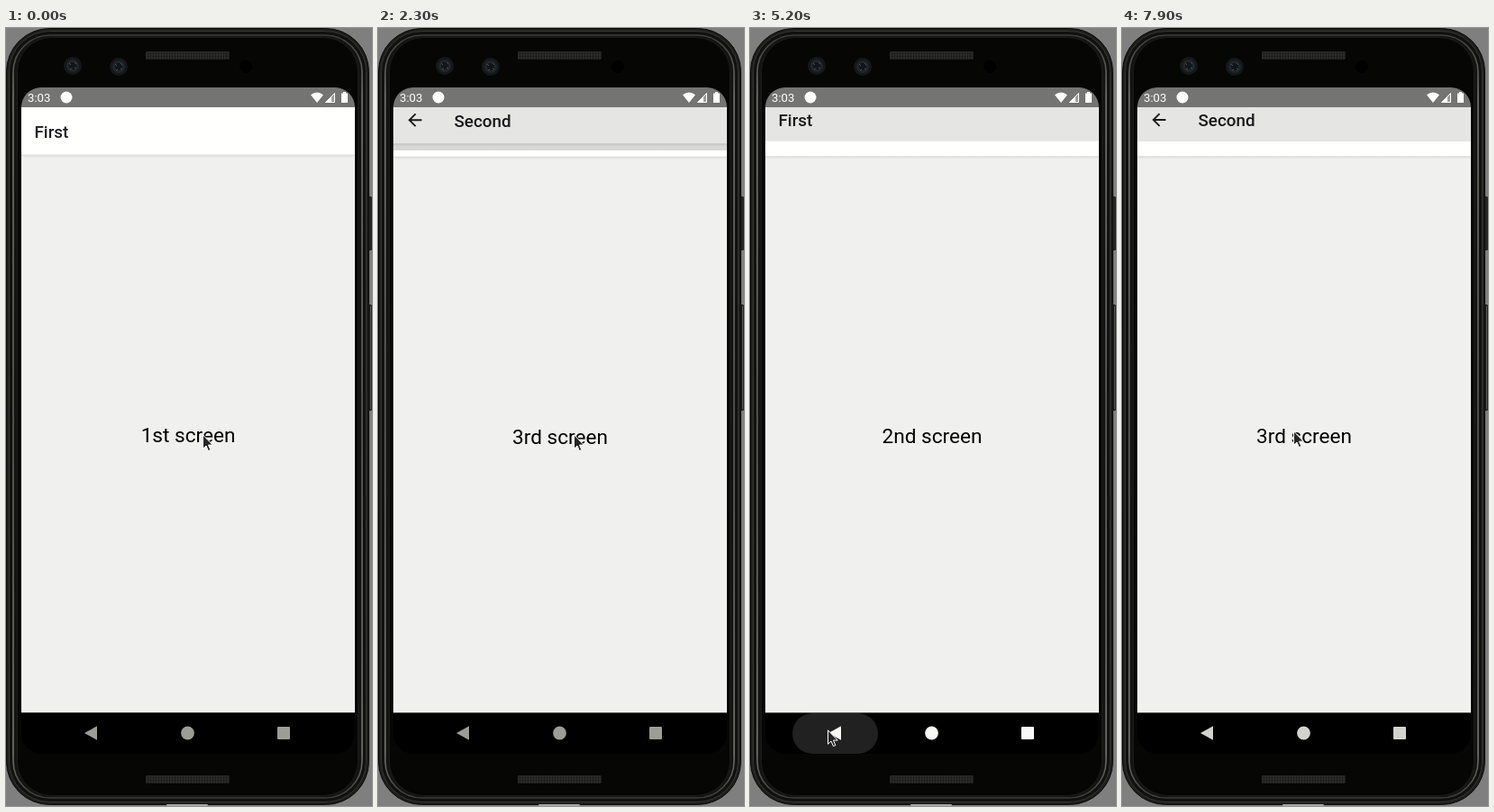
An HTML page for the animation above (8000 ms loop, 406 px wide and 864 px high).

```html
<!DOCTYPE html>
<html lang="en">
<head>
<meta charset="utf-8">
<title>Stack navigation</title>
<style>
  html, body { margin: 0; width: 100%; height: 100%; overflow: hidden; background: #7f7f7f; }
  svg { display: block; width: 406px; height: 864px; }
  text { font-family: Roboto, "Open Sans", sans-serif; }
  .title { font-size: 18.84px; font-weight: 500; fill: #1c1c1e; }
  .label { font-size: 22.6px; text-anchor: middle; fill: #000; }
</style>
</head>
<body>
<svg viewBox="0 0 406 864">
  <defs>
    <linearGradient id="shadow" x2="0" y2="1">
      <stop offset="0" stop-color="#d3d3d2"/>
      <stop offset="1" stop-color="#f0f0ef"/>
    </linearGradient>
    <linearGradient id="rim" x2="0" y2="1">
      <stop offset="0" stop-color="#3c3c39"/>
      <stop offset=".08" stop-color="#73736e"/>
      <stop offset=".5" stop-color="#5c5c58"/>
      <stop offset=".94" stop-color="#73736e"/>
      <stop offset="1" stop-color="#3c3c39"/>
    </linearGradient>
    <pattern id="mesh" width="3" height="3" patternUnits="userSpaceOnUse">
      <rect width="3" height="3" fill="#2b2b29"/>
      <circle cx="1.5" cy="1.5" r=".9" fill="#151514"/>
    </pattern>
    <clipPath id="window"><rect x="17" y="88" width="370" height="672.5"/></clipPath>
    <clipPath id="reveal"><rect id="revealBox" x="17" width="370"/></clipPath>
    <g id="lens">
      <circle r="10" fill="#15181a"/>
      <circle r="7" fill="#20262a"/>
      <circle r="4" fill="#121619"/>
      <path d="M-4-3l2 2M2-4l2 2M-3 4l2-1M2 2l2 1" stroke="#4a5258"/>
    </g>
  </defs>

  <!-- phone body -->
  <rect x="400" y="187" width="6" height="60" rx="1.5" fill="#262624"/>
  <rect x="400" y="307" width="6" height="118" rx="1.5" fill="#262624"/>
  <path d="M404.5 309V423" stroke="#555551"/>
  <rect x=".5" y=".5" width="402" height="862" rx="48" fill="#1d1d1b" stroke="#0c0c0b"/>
  <rect x="3.5" y="3.5" width="396" height="856" rx="45" fill="#111110" stroke="#383835"/>
  <rect x="8" y="8" width="387" height="847" rx="41" fill="#141413" stroke="url(#rim)" stroke-width="1.6"/>
  <rect x="12.5" y="10.5" width="378" height="842" rx="38" fill="#060605" stroke="#1c1c1a"/>
  <rect x="178" y="862" width="46" height="2" rx="1" fill="#a5a5a1"/>
  <rect x="155" y="26" width="93" height="9" rx="1.5" fill="url(#mesh)"/>
  <rect x="155" y="830" width="93" height="9" rx="1.5" fill="url(#mesh)"/>
  <use href="#lens" x="74" y="42"/>
  <use href="#lens" x="125" y="43"/>
  <circle cx="266" cy="43" r="7" fill="#000"/>

  <!-- status bar -->
  <path d="M17 88.5V88a22 22 0 0 1 22-22H365a22 22 0 0 1 22 22v.5z" fill="#747473"/>
  <text x="24" y="82" font-size="13.2" fill="#fff">3:03</text>
  <g fill="#fff">
    <circle cx="67" cy="77" r="6.5"/>
    <path d="M345 83L338 74.2Q345 68.8 352 74.2z"/>
    <path d="M354 83L365 71.5V83z" fill-opacity=".3"/>
    <path d="M354 83L361 75.7V83z"/>
    <path d="M354.8 82.5L364.5 72.5V82.5z" fill="none" stroke="#fff"/>
    <path d="M372 72.5h2V71h3v1.5h2V83h-7z"/>
  </g>

  <!-- screens -->
  <g clip-path="url(#window)">
    <g id="below"></g>
    <rect id="dim" x="17" y="88" width="370" height="673"/>
    <g clip-path="url(#reveal)"><g id="above"></g></g>
  </g>

  <!-- navigation bar -->
  <path d="M17 760.5H387V784a22 22 0 0 1-22 22H39a22 22 0 0 1-22-22z"/>
  <rect id="navRipple" x="47" y="761" width="95" height="45" rx="22.5" fill="#fff"/>
  <g id="navIcons">
    <path d="M87 783L101 775.3V790.7z"/>
    <circle cx="201.5" cy="783" r="7.4"/>
    <rect x="301" y="776" width="14" height="14" rx="1"/>
  </g>

  <path id="cursor" d="M.5.8V16.2L4 13l2.4 5.6 2.5-1-2.4-5.5h4.8z" fill="#252525" stroke="#fff" stroke-linejoin="round"/>
</svg>
<script>
const LOOP = 8000, STEP = 100, PUSH_TIME = 425;
const TOP = 88, HEIGHT = 672;

// start time and direction of every push (+1) and pop (-1)
const moves = [[675, 1], [2080, 1], [3780, -1], [5183, -1], [6848, 1], [7663, 1]];

// [time, value, ...] tracks, joined linearly
const cursorTrack = [
  [0, 218, 451], [800, 218, 451], [900, 217, 451], [2500, 217, 451],
  [2700, 125, 321], [2800, 125, 321], [3100, 66, 160], [3400, 41, 111],
  [4200, 41, 111], [4300, 151, 451], [4400, 151, 451], [4700, 108, 672],
  [4900, 86, 779], [5700, 86, 779], [5900, 115, 706], [6200, 162, 520],
  [6400, 181, 446], [7500, 181, 446], [7600, 190, 447]
];
const backRippleTrack = [[3400, 0], [3700, .31], [3800, .31], [4000, 0]];
const navRippleTrack = [[5000, 0], [5200, .13], [5300, .13], [5700, 0]];
const navShadeTrack = [[5000, 157], [5100, 240], [5300, 255], [7700, 255], [7900, 210]];

const $ = id => document.getElementById(id);

function sample(track, t) {
  const next = track.findIndex(key => key[0] > t);
  if (next === 0) return track[0].slice(1);
  if (next < 0) return track[track.length - 1].slice(1);
  const a = track[next - 1], b = track[next];
  const k = (t - a[0]) / (b[0] - a[0]);
  return a.slice(1).map((v, i) => v + (b[i + 1] - v) * k);
}

// cubic-bezier(.35, .45, 0, 1)
function ease(x) {
  if (x <= 0) return 0;
  if (x >= 1) return 1;
  const curve = (s, a, b) => 3 * (1 - s) ** 2 * s * a + 3 * (1 - s) * s * s * b + s ** 3;
  let lo = 0, hi = 1;
  for (let i = 0; i < 24; i++) {
    const mid = (lo + hi) / 2;
    if (curve(mid, .35, 0) < x) lo = mid; else hi = mid;
  }
  return curve(lo, .45, 1);
}

function card(title, label, hasBack) {
  const back = `
    <circle class="ripple" cx="41" cy="114.8" r="20" fill-opacity="0"/>
    <path transform="translate(29.7 103.4) scale(.942)" fill="#1c1c1e"
      d="M20 11H7.83l5.59-5.59L12 4l-8 8 8 8 1.41-1.41L7.83 13H20z"/>`;
  return `
    <rect x="17" y="60" width="370" height="740" fill="#f0f0ef"/>
    <rect x="17" y="140" width="370" height="4" fill="url(#shadow)"/>
    <rect x="17" y="60" width="370" height="80.7" fill="#fffffe"/>
    ${hasBack ? back : ''}
    <text class="title" x="${hasBack ? 84.5 : 31.5}" y="122">${title}</text>
    <text class="label" x="202" y="459.7">${label}</text>`;
}

const cards = [
  card('First', '1st screen', false),
  card('Second', '2nd screen', true),
  card('Third', '3rd screen', true)
];

function show(slot, index) {
  if (slot.dataset.index === String(index)) return;
  slot.dataset.index = index;
  slot.innerHTML = cards[index] || '';
}

const shift = (node, x, y) => node.setAttribute('transform', `translate(${x} ${y})`);

function draw(t) {
  const depth = moves.reduce((sum, [at, dir]) => sum + dir * ease((t - at) / PUSH_TIME), 0);
  const base = Math.floor(depth + 1e-6);
  const p = Math.max(0, depth - base);
  const edge = HEIGHT * (1 - p);

  show($('below'), base);
  show($('above'), p > 1e-5 ? base + 1 : -1);
  shift($('below'), 0, -HEIGHT * .02 * p);
  shift($('above'), 0, edge * .041);
  $('revealBox').setAttribute('y', TOP + edge);
  $('revealBox').setAttribute('height', HEIGHT - edge + 1);
  $('dim').setAttribute('fill-opacity', Math.min(p / .36, 1) * .1);

  const ripple = document.querySelector(base === 2 ? '#below .ripple' : '#above .ripple');
  if (ripple) ripple.setAttribute('fill-opacity', sample(backRippleTrack, t)[0]);

  const shade = sample(navShadeTrack, t)[0];
  $('navIcons').setAttribute('fill', `rgb(${shade},${shade},${shade - (255 - shade) * .06})`);
  $('navRipple').setAttribute('fill-opacity', sample(navRippleTrack, t)[0]);
  shift($('cursor'), ...sample(cursorTrack, t));
}

const start = performance.now();
function tick() {
  const t = (performance.now() - start) % LOOP;
  draw(Math.floor(t / STEP) * STEP);
  requestAnimationFrame(tick);
}
tick();
</script>
</body>
</html>
```
